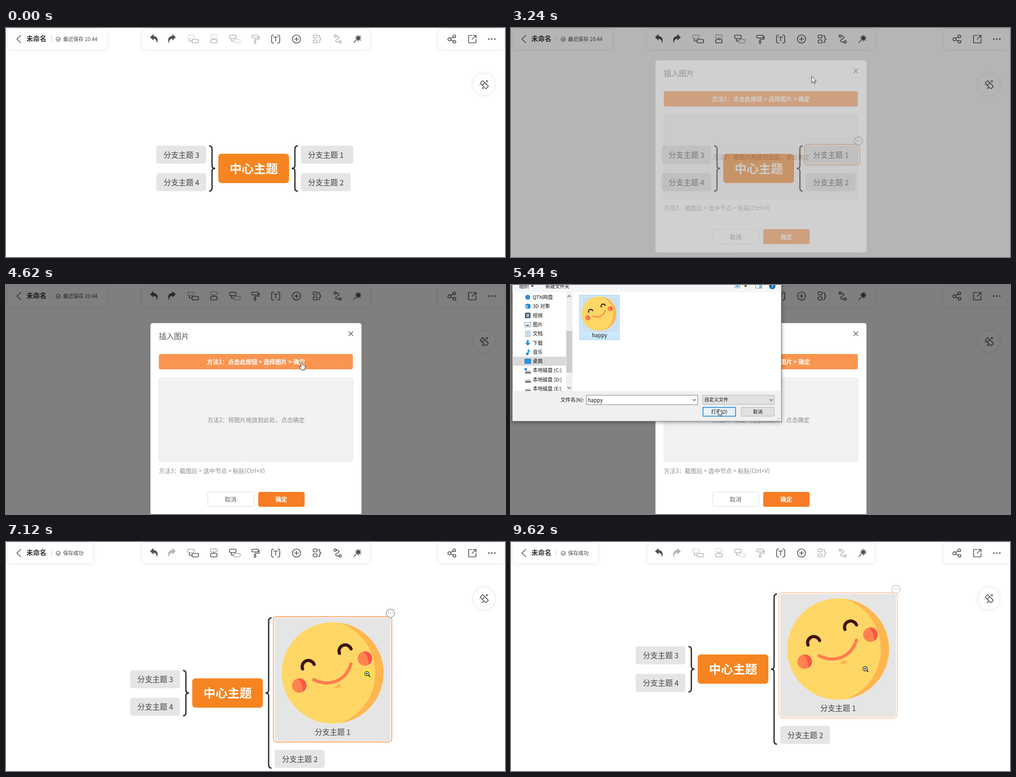
An HTML page for the animation above (9.69 s loop, 1102 by 508 pixels).

```html
<!DOCTYPE html>
<html lang="zh-CN">
<head>
<meta charset="utf-8">
<title>插入图片</title>
<style>
  html, body { margin: 0; width: 100%; height: 100%; overflow: hidden; background: #fff; }
  svg { display: block; font-family: "Noto Sans CJK SC", "Noto Sans CJK", "Noto Sans", sans-serif; }
  .card { fill: #fff; filter: drop-shadow(0 0 4px rgba(0, 0, 0, .11)); }
  .icon { fill: none; stroke: #505050; stroke-width: 1.7; stroke-linecap: round; stroke-linejoin: round; }
  .icon.off { stroke: #b4b4b4; }
  .icon .solid { fill: #505050; stroke-width: .6; }
  .icon.off .solid { fill: #b4b4b4; }
  .dash { stroke-dasharray: 2 2; stroke-width: 1.4; stroke-linecap: butt; }
  .brace { fill: none; stroke: #333; stroke-width: 3; }
  .thin { fill: none; stroke: #555; stroke-width: 1.2; }
  .ring { fill: none; stroke: #f8a05c; stroke-width: 1.8; }
  .pointer { fill: #fff; stroke: #222; stroke-width: 1; stroke-linejoin: round; }
</style>
</head>
<body>
<svg id="stage" width="1102" height="508" viewBox="0 0 1102 508"></svg>
<script>
const LOOP = 9690;
const stage = document.getElementById('stage');

const rect = (x, y, w, h, r, attrs = '') =>
  `<rect x="${x}" y="${y}" width="${w}" height="${h}" rx="${r}" ${attrs}/>`;
// y is the optical middle of the line
const text = (x, y, size, str, attrs = '') =>
  `<text x="${x}" y="${y + size * 0.37}" font-size="${size}" ${attrs}>${str}</text>`;
const mid = 'text-anchor="middle" ';
const path = (d, attrs = '') => `<path d="${d}" ${attrs}/>`;
const group = (id, body, attrs = '') => `<g id="${id}" ${attrs}>${body}</g>`;
const icon = (body, cls = '') => `<g class="icon ${cls}">${body}</g>`;
const face = (x, y, r) => `<use href="#face" transform="translate(${x} ${y}) scale(${r / 112.5})"/>`;

// ---- mind map ----
const node = (x, y, w, label) => rect(x, y, w, 40, 5, 'fill="#e5e5e5"') +
  text(x + 16, y + 20.5, 16.5, label, 'font-weight="300" fill="#444"');

// side is 1 when the arms point right, -1 when they point left
function brace(x, top, tip, bottom, side) {
  const arm = x + 7 * side, end = x + 13.5 * side;
  return path(`M${end} ${top}Q${arm} ${top} ${arm} ${top + 7}V${tip - 6}Q${arm} ${tip} ${x} ${tip}` +
    `Q${arm} ${tip} ${arm} ${tip + 6}V${bottom - 7}Q${arm} ${bottom} ${end} ${bottom}`, 'class="brace"');
}

function ring(id, x, y, w, h) {
  const cx = x + w - 3, cy = y - 8;
  const dots = [-4, 0, 4].map(d => `<circle cx="${cx + d}" cy="${cy}" r="1.1" fill="#999"/>`).join('');
  return group(id, rect(x, y, w, h, 6, 'fill="none" stroke="#fff" stroke-width="5"') +
    rect(x, y, w, h, 7, 'class="ring"') +
    path(`M${cx - 2} ${cy + 9}a9.3 8.8 0 1 1 4 0l-2 2z`, 'fill="#fff" stroke="#a4a4a4" stroke-width="1.7"') + dots);
}

const cheek = (x, y) => `<g transform="translate(${x} ${y})"><circle r="16" fill="#ff8250"/>` +
  path('M-3 -15.7A16 16 0 0 1 8 13.9Q8 -6 -3 -15.7', 'fill="#ff5545"') + '</g>';

const faceArt = '<circle r="112.5" fill="#ffd766"/>' +
  path('M18 -111A112.5 112.5 0 0 1 18 111A119 119 0 0 0 18 -111', 'fill="#ffb64f"') +
  cheek(-74, 28) + cheek(71, -32) +
  '<g fill="none" stroke-width="7" stroke-linecap="round">' +
  path('M-66.5 -9A13.5 13.5 0 0 1 -41 -19M15 -43.5A13.5 13.5 0 0 1 40.5 -53.5', 'stroke="#40140f"') +
  path('M-42 15C-12 30 27 22 40.5 -20', 'stroke="#ff7d50"') +
  path('M9 31L15 28.5', 'stroke="#ffb44f"') + '</g>';

const trunk = node(332, 261, 110, '分支主题 3') + node(332, 322, 110, '分支主题 4') +
  brace(462, 261.5, 311.5, 362, -1) +
  rect(469, 279, 156, 65, 7, 'fill="#f68420"') +
  text(547, 312, 26.7, '中心主题', mid + 'font-weight="700" fill="#fff"');

const plainBranch = brace(631, 261.5, 311.5, 362, 1) +
  node(651, 261, 116, '分支主题 1') + node(651, 322, 110, '分支主题 2') + ring('plainRing', 648.2, 258.2, 122, 45.6);

const pictureBranch = brace(573, 168.5, 335, 501.5, 1) +
  rect(593.5, 168, 256, 273, 5, 'fill="#e5e5e5"') + face(721.5, 290.5, 112.5) +
  text(721.5, 421.5, 16.5, '分支主题 1', mid + 'font-weight="300" fill="#444"') +
  node(593.5, 461, 110, '分支主题 2') + ring('pictureRing', 590.5, 165.5, 261.5, 278);

// ---- toolbar ----
const box = (x, y, cls = '') => rect(x, y, 14, 7.5, 1.5, `class="${cls}"`);
const undoArrow = 'M318.5 20.5L325.5 14V18C333 18.5 336.5 24 333.5 33C332.5 26.5 331 24 325.5 23.5V27Z';
const burst = Array.from({ length: 8 }, (_, i) => {
  const a = i * Math.PI / 4, c = Math.cos(a), s = Math.sin(a);
  return `M${778 + 3 * c} ${22.5 + 3 * s}L${778 + 6.5 * c} ${22.5 + 6.5 * s}`;
}).join('');

const toolbar = rect(301, 2.5, 502, 45, 6, 'class="card"') +
  icon(path(undoArrow, 'class="solid"')) +
  group('redo', path(undoArrow, 'class="solid" transform="translate(693 0) scale(-1 1)"'), 'class="icon"') +
  group('nodeTools',
    box(401.5, 16, 'dash') + box(411, 25.5) + path('M405 24V29H410') +
    box(452, 15, 'dash') + box(452, 25.5) + path('M459 22V25') +
    box(494, 16) + box(503, 25.5, 'dash') + path('M498 24V29H502') +
    rect(543, 16, 14, 6, 1.5) + path('M557 19H559V25H550V28') + rect(548.5, 28, 3, 6, 1) +
    rect(678.5, 15.5, 8.5, 6.5, 1.5) + rect(678.5, 26.5, 8.5, 6.5, 1.5) +
    path('M690 16.5Q693 16.5 693 20Q693 24.5 696 24.5Q693 24.5 693 29Q693 32.5 690 32.5') +
    '<circle cx="727" cy="18" r="2.6"/><circle cx="738" cy="31" r="2.6"/>' +
    path('M730 18C737 18.5 736.5 22.5 732 24.5C726 27 726.5 31.5 735 31'), 'class="icon"') +
  icon(path('M591 15.5Q586.5 15.5 586.5 19V30Q586.5 33.5 591 33.5M600 15.5Q604.5 15.5 604.5 19V30Q604.5 33.5 600 33.5M591 20H600M595.5 20V29')) +
  icon('<circle cx="641.5" cy="24.5" r="9"/>' + path('M637 24.5H646M641.5 20V29')) +
  icon('<circle cx="778" cy="22.5" r="4" class="solid"/>' + path(burst + 'M774 26.5L768 32.5'));

const header = group('headerCard', rect(4, 2.5, 219, 45, 6, 'class="card"')) +
  icon(path('M32.5 16.5L24 24.5L32.5 32.5')) +
  text(45, 24, 14.8, '未命名', 'font-weight="700" fill="#333"') +
  path('M100 17.5V31', 'stroke="#ccc"') +
  '<circle cx="115.5" cy="25" r="4.7" class="thin" />' + path('M113 25L115 27L118.3 23.5', 'class="thin"') +
  '<text id="saved" x="126" y="28.7" font-size="11.3" font-weight="300" fill="#444"></text>';

const sideTools = rect(955, 2.5, 145, 45, 6, 'class="card"') +
  icon('<circle cx="979.3" cy="25" r="3.4"/><circle cx="990" cy="18.5" r="3"/><circle cx="990.5" cy="30.5" r="3"/>' +
    path('M982.5 23L987.3 20M982.5 26.5L987.5 29.3')) +
  icon(path('M1029 16.5H1023.5Q1021.5 16.5 1021.5 18.5V31Q1021.5 33 1023.5 33H1036Q1038 33 1038 31V25M1032 16.5H1038V22M1038 16.5L1029.5 25')) +
  [1066.5, 1073, 1079.5].map(x => `<circle cx="${x}" cy="24.5" r="1.7" fill="#505050"/>`).join('') +
  '<circle cx="1055.5" cy="125.5" r="23.5" class="card"/>' +
  icon('<g transform="rotate(45 1056 125.5)">' + rect(1047.5, 121.5, 18, 8, 1.5) + path('M1054 121.5V129.5') + '</g>' +
    path('M1062 115.5l.8 1.7 1.7.8-1.7.8-.8 1.7-.8-1.7-1.7-.8 1.7-.8zM1053 131.5l.7 1.2 1.2.3-1 .8v1.2l-1-.7-1.2.5.3-1.2-.7-1h1.2z', 'class="solid"') +
    path('M1046.5 126.5h.1'));

// ---- insert menu ----
const menuItems = ['插入链接', '插入图片', '插入备注', '插入图标'];
const menu = rect(570, 54, 144, 156, 5, 'class="card"') +
  menuItems.map((label, i) => text(613, 78 + 36 * i, 14, label, 'class="item"')).join('');

// ---- insert picture window ----
const modal = rect(319, 84.5, 466, 426, 5, 'fill="#fff"') +
  text(337.5, 114, 16.7, '插入图片', 'fill="#555"') +
  path('M756.5 103L766.5 113M766.5 103L756.5 113', 'stroke="#555" stroke-width="1.4"') +
  rect(337.5, 153, 428.5, 34, 4, 'id="pick"') +
  text(552, 170, 13, '方法1：点击此按钮 &gt; 选择图片 &gt; 确定', mid + 'font-weight="700" fill="#fff"') +
  rect(337.5, 206, 428.5, 185.5, 4, 'fill="#f2f2f2" stroke="#d9d9d9" stroke-dasharray="3 2"') +
  group('dropHint', text(552, 299, 13, '方法2：将图片拖放到此处，点击确定', mid + 'fill="#8c8c8c"')) +
  group('preview', face(551.5, 299.5, 92.3)) +
  text(337.5, 412, 13, '方法3：截图后 &gt; 选中节点 &gt; 粘贴(Ctrl+V)', 'fill="#8c8c8c"') +
  rect(445.5, 459.5, 102, 32, 3, 'fill="#fff" stroke="#dcdcdc"') + text(496, 475.5, 13, '取消', mid + 'fill="#666"') +
  rect(557, 459, 102.5, 33, 4, 'id="confirm"') +
  text(608, 475.5, 13, '确定', mid + 'font-weight="700" fill="#fff"');

// ---- file window ----
const blue = 'fill="#1b8ae0"';
const drive = rect(31, 3, 13, 4, 1, 'fill="#777"') + path('M33 0H42L44 3H31Z', 'fill="#c9c9c9"');
const places = [
  ['QTN网盘', '<circle cx="37" cy="0" r="5.5" fill="#2f8be6"/>'],
  ['3D 对象', path('M31 -4L37 -6L43 -4V4L37 6L31 4Z', blue) + path('M31 -4L37 -2V6L31 4Z', 'fill="#7cc4f2"')],
  ['视频', rect(31, -6, 12, 12, 1, 'fill="#444"') + rect(33.5, -4, 7, 8, 0, 'fill="#8db4d8"')],
  ['图片', rect(30.5, -5, 13, 10, 0, 'fill="#f7f7f7" stroke="#888"') + path('M32 3L36 -1L42 3Z', blue)],
  ['文档', rect(32, -6, 10, 12, 0, 'fill="#fff" stroke="#888"') + path('M34 -3H40M34 0H40M34 3H40', 'stroke="#1b8ae0"')],
  ['下载', path('M35 -6H39V0H43L37 6L31 0H35Z', blue)],
  ['音乐', '<circle cx="36" cy="4" r="3" fill="#1b8ae0"/>' + path('M38 4V-6Q39 -3 42 -1', 'stroke="#1b8ae0" stroke-width="2" fill="none"')],
  ['桌面', rect(30.5, -5, 13, 10, 1, 'fill="#1b9af0" stroke="#0f5fa8"')],
  ['本地磁盘 (C:)', drive + rect(30, -5, 5, 5, 0, blue)],
  ['本地磁盘 (D:)', drive],
  ['本地磁盘 (E:)', drive],
];
const chevron = (x, y, s = 1) => path(`M${x - 3.5} ${y - 2 * s}L${x} ${y + 2 * s}L${x + 3.5} ${y - 2 * s}`, 'class="thin"');
const caret = x => path(`M${x - 3.5} 1H${x + 3.5}L${x} 5Z`, 'fill="#333"');

const files = rect(3, -30, 594, 332, 0, 'fill="#fff" stroke="#666" style="filter:drop-shadow(0 2px 5px rgba(0,0,0,.4))"') +
  rect(3.5, -30, 593, 46, 0, 'fill="#f5f6f7"') +
  text(18, 3, 11, '组织') + caret(47) + text(76, 3, 10.6, '新建文件夹') +
  rect(494.5, -5, 11, 11, 0, 'fill="#fff" stroke="#888"') + path('M496 4L500 0L504 4Z', blue) + caret(518) +
  rect(540.5, -5, 13, 12, 0, 'fill="#fff" stroke="#777"') + rect(548, -3, 5, 9, 0, 'fill="#7bb8ea"') +
  '<circle cx="577" cy="2.5" r="7" fill="#0d6ab8"/>' + text(577, 3, 11, '?', mid + 'font-weight="700" fill="#fff"') +
  rect(3.5, 159, 118, 20, 0, 'fill="#d9d9d9"') +
  places.map(([label, art], i) => `<g transform="translate(0 ${27 + 20.3 * i})">${art}${text(48, 0, 11, label)}</g>`).join('') +
  rect(122, 16, 13, 219, 0, 'fill="#f0f0f0"') + rect(122, 102, 13, 92, 0, 'fill="#cdcdcd"') +
  chevron(128.5, 25, -1) + chevron(128.5, 228) + path('M135.5 16V235', 'stroke="#eee"') +
  rect(151.5, 22.5, 88, 99, 0, 'id="fileMark" fill="#cce8ff" stroke="#99d1ff"') +
  rect(156, 25, 77, 77, 0, 'fill="#fff" fill-opacity=".2" style="filter:drop-shadow(1px 1px 1px #999)"') +
  face(194.3, 63.5, 38.3) + text(195.5, 112, 11.3, 'happy', mid) +
  rect(3.5, 235, 593, 66.5, 0, 'fill="#f0f0f0"') +
  text(161, 255, 11, '文件名(N):', 'text-anchor="end"') +
  rect(166.5, 244.5, 246, 21, 0, 'fill="#fff" stroke="#7a7a7a"') + text(169.5, 255.5, 11.3, 'happy', 'id="fileName"') + chevron(405, 255) +
  rect(423.5, 244.5, 158, 20.5, 0, 'fill="#e1e1e1" stroke="#adadad"') + text(427, 254.5, 10.6, '自定义文件') + chevron(574.5, 255) +
  rect(424, 271.5, 72, 19.5, 0, 'fill="#e5f1fb" stroke="#0078d7" stroke-width="1.5"') + text(460, 281, 10.6, '打开(O)', mid) +
  rect(508.5, 271.5, 72.5, 19.5, 0, 'fill="#e1e1e1" stroke="#adadad"') + text(545, 281, 10.6, '取消', mid) +
  path('M588 299L594 293M592 299L594 297', 'stroke="#aaa"');

// ---- pointers, drawn around their hot spot ----
const pointers =
  group('arrow', path('M0 0V14.5L3.3 11.5L5.6 16.5L8 15.4L5.8 10.6H10.2Z', 'class="pointer"')) +
  group('hand', path('M-1.5 1.5Q0 -1 1.5 1.5V7L7 8.2Q8.3 8.6 8 10.5L6.5 18.5H-1.2L-5 11.8Q-5 9.8 -3.4 10.5L-1.5 12.3Z', 'class="pointer"')) +
  group('zoom', '<circle id="glow" r="10.5" fill="#ffe93b"/>' + path('M3 3L7 7', 'stroke="#222" stroke-width="2.2"') +
    '<circle r="4.8" fill="#fff" fill-opacity=".7" stroke="#222" stroke-width="1.4"/>' + path('M-2.5 0H2.5M0 -2.5V2.5', 'stroke="#222" stroke-width="1.3"'));

stage.innerHTML = `<defs>${group('face', faceArt)}</defs>` +
  group('map', group('trunk', trunk) + group('plainBranch', plainBranch) + group('pictureBranch', pictureBranch)) +
  header + toolbar + sideTools + group('menu', menu) +
  rect(0, 0, 1102, 508, 0, 'id="shade"') + group('modal', modal) + group('files', files, 'fill="#111"') +
  group('pointer', pointers);

// ---- motion ----
const part = id => document.getElementById(id);
const show = (id, opacity) => {
  part(id).style.opacity = Number(opacity);
  part(id).style.display = opacity ? '' : 'none';
};
const move = (id, x, y) => part(id).setAttribute('transform', `translate(${x} ${y})`);
const ramp = (t, from, length) => Math.min(1, Math.max(0, (t - from) / length));
const smooth = p => p * p * (3 - 2 * p);

// CSS "ease": cubic-bezier(.25, .1, .25, 1)
function ease(p) {
  let lo = 0, hi = 1, s = p;
  const bezier = (a, b) => 3 * s * (1 - s) ** 2 * a + 3 * s * s * (1 - s) * b + s ** 3;
  for (let i = 0; i < 16; i++) {
    s = (lo + hi) / 2;
    if (bezier(.25, .25) < p) lo = s; else hi = s;
  }
  return bezier(.1, 1);
}

// time, x, y
const track = [
  [100, 1042, 500], [960, 700, 289], [1130, 700, 289], [1590, 647, 38], [1700, 647, 38], [1850, 644, 27], [2150, 644, 27],
  [2550, 658, 138], [2830, 664, 107], [3280, 664, 107], [3760, 643, 189], [3950, 643, 189], [4410, 653, 170],
  [4820, 653, 170], [5120, 200, 78], [5200, 200, 78], [5430, 458, 275], [5790, 458, 275], [6600, 613, 474],
  [6979, 613, 474], [6980, 797, 292], [7500, 797, 292], [7720, 922, 370], [7800, 922, 370], [8010, 923, 317],
  [8230, 923, 317], [8480, 1000, 350], [9380, 1000, 350], [9610, 782, 281], [LOOP, 782, 281],
];
function pointerAt(t) {
  const i = Math.max(1, track.findIndex(k => k[0] > t));
  const [a, b] = [track[i - 1], track[i]];
  const p = smooth(ramp(t, a[0], b[0] - a[0]));
  return [a[1] + (b[1] - a[1]) * p, a[2] + (b[2] - a[2]) * p];
}

function draw(t) {
  const [x, y] = pointerAt(t);
  const inserted = t >= 6980;
  const selected = t >= 1000 && t < 7760;
  const drag = smooth(ramp(t, 7800, 210));

  move('map', drag, -53 * drag);
  move('trunk', inserted ? -57.7 : 0, inserted ? 23.5 : 0);
  show('plainBranch', !inserted);
  show('pictureBranch', inserted);
  const hovered = (t > 850 && t < 1000) || (t > 9400 && x < 852);
  const ringOpacity = selected ? 1 : hovered ? 0.55 : 0;
  show('plainRing', ringOpacity);
  show('pictureRing', ringOpacity);

  part('nodeTools').setAttribute('class', selected ? 'icon' : 'icon off');
  part('redo').setAttribute('class', inserted ? 'icon off' : 'icon');
  part('saved').textContent = inserted ? '保存成功' : '最近保存 10:44';
  part('headerCard').firstChild.setAttribute('width', inserted ? 188 : 219);

  show('menu', t < 3100 ? ramp(t, 1860, 140) : 0);
  const active = Math.round((y - 78) / 36);
  document.querySelectorAll('.item').forEach((item, i) => item.setAttribute('fill', i === active ? '#f87d26' : '#444'));

  const leaving = 1 - ramp(t, 6930, 180);
  const entering = ease(ramp(t, 3172, 300));
  show('shade', 0.5 * ease(ramp(t, 3174, 200)) * leaving);
  show('modal', entering * leaving);
  move('modal', 0, -20 * (1 - entering * leaving));
  const loaded = ramp(t, 5930, 140);
  show('dropHint', loaded === 0);
  show('preview', loaded);
  const onConfirm = t > 5800 && t < 6980 && y > 459 && x > 557;
  part('confirm').setAttribute('fill', onConfirm ? '#fa9550' : '#f87d26');
  part('pick').setAttribute('fill', y < 140 && t < 4000 ? '#f87d26' : '#fa9550');

  const open = smooth(ramp(t, 4800, 160)) * (1 - smooth(ramp(t, 5660, 190)));
  const scale = 0.92 + 0.08 * open;
  show('files', open);
  part('files').setAttribute('transform', `translate(300 136) scale(${scale}) translate(-300 -136)`);
  show('fileMark', t > 5150 ? 1 : t > 5060 ? 0.5 : 0);
  show('fileName', t > 5150);

  const zoom = inserted && x < 834;
  const hand = (t > 1170 && t < 3170 && y < 160) || (t > 4000 && t < 4820 && y < 187) || onConfirm;
  show('pointer', t >= 130);
  move('pointer', x, y);
  show('zoom', zoom);
  show('hand', !zoom && hand);
  show('arrow', !zoom && !hand);
  show('glow', t < 7190);
}

function tick() {
  draw(performance.now() % LOOP);
  requestAnimationFrame(tick);
}
tick();
</script>
</body>
</html>
```
